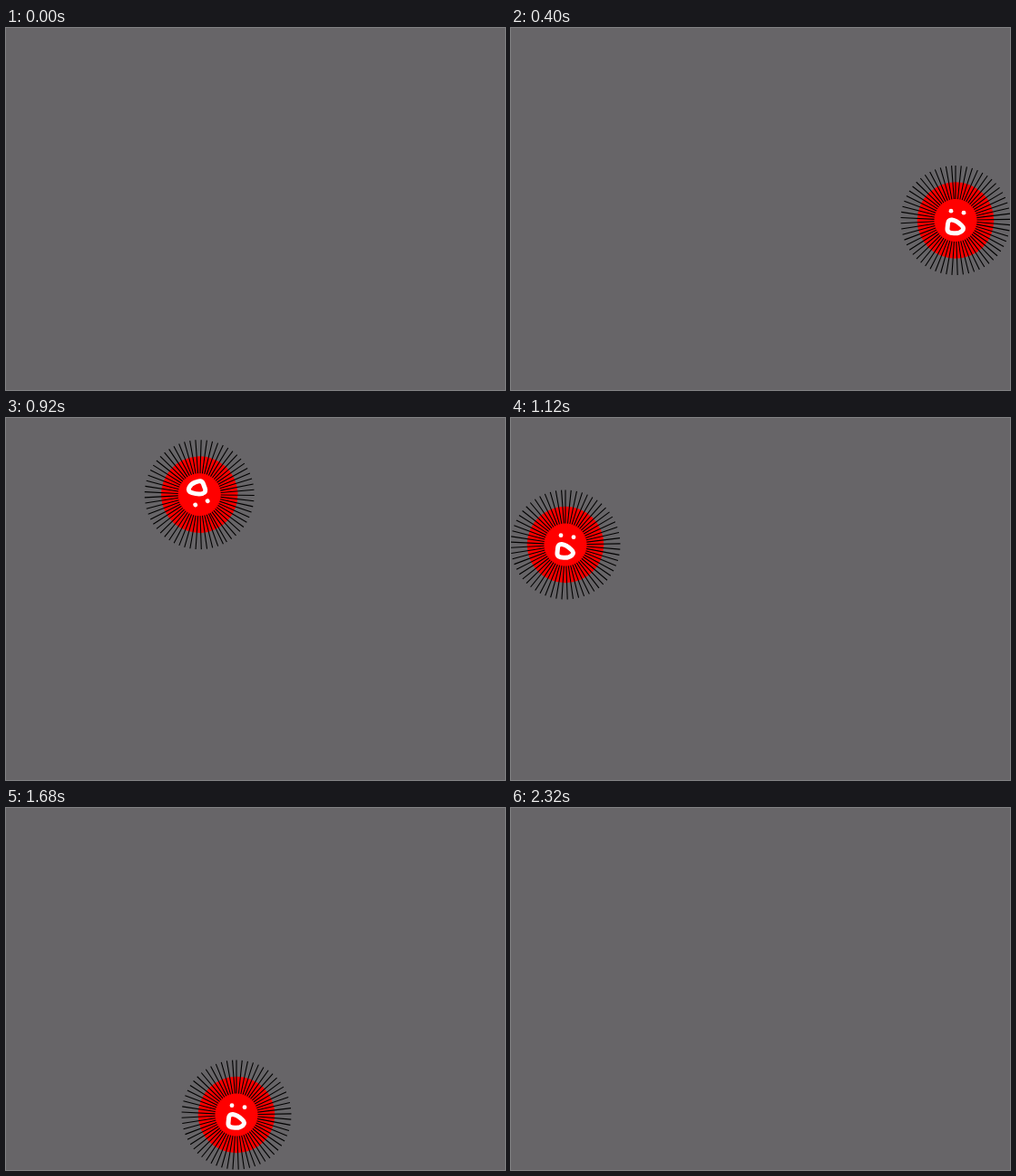
An HTML page with a canvas that plays this animation: 550 by 400 pixels, repeating every 2400 ms.

```html
<!DOCTYPE html>
<html lang="en">
<head>
<meta charset="utf-8">
<title>Bouncing sun</title>
<style>
  html, body { margin: 0; width: 100%; height: 100%; overflow: hidden; background: #676568; }
  canvas { display: block; }
</style>
</head>
<body>
<canvas id="stage" width="550" height="400"></canvas>
<script>
const ctx = document.getElementById('stage').getContext('2d');
const STEP = 40, LOOP = 2400, LAST = 58;
const RAYS = 61, RAY_GAP = 5.93 * Math.PI / 180;

// Bounce points; turns = whole rotations on the way to the next point
const path = [
  { at: 0,  x: -63,   y: 330,   turns: -2 },
  { at: 10, x: 490,   y: 212.5, turns: -4 },
  { at: 21, x: 274.5, y: 62.5,  turns: -2 },
  { at: 28, x: 60,    y: 140,   turns: -4 },
  { at: 42, x: 254,   y: 339,   turns: -2 },
  { at: 52, x: 489,   y: 226.5, turns: -2 },
  { at: 58, x: -63,   y: 330,   turns: 0 }
];

function poseAt(step) {
  let i = 0;
  while (i < path.length - 2 && step >= path[i + 1].at) i++;
  const a = path[i], b = path[i + 1];
  const k = (step - a.at) / (b.at - a.at);
  return {
    x: a.x + (b.x - a.x) * k,
    y: a.y + (b.y - a.y) * k,
    angle: k * a.turns * 2 * Math.PI
  };
}

function disc(x, y, radius, color) {
  ctx.fillStyle = color;
  ctx.beginPath();
  ctx.arc(x, y, radius, 0, 2 * Math.PI);
  ctx.fill();
}

// The ring of rays closes with a slightly narrower gap at the top
function drawRays() {
  ctx.strokeStyle = '#000';
  ctx.lineWidth = 1.1;
  ctx.beginPath();
  for (let i = 0; i < RAYS; i++) {
    const a = i * RAY_GAP - Math.PI / 2;
    const c = Math.cos(a), s = Math.sin(a);
    ctx.moveTo(c * 23.5, s * 23.5);
    ctx.lineTo(c * 60.5, s * 60.5);
  }
  ctx.stroke();
}

function drawFace() {
  disc(-5, -10.3, 2.4, '#fff');
  disc(9, -8.3, 2.4, '#fff');
  ctx.strokeStyle = '#fff';
  ctx.lineWidth = 5;
  ctx.lineJoin = 'round';
  ctx.beginPath();
  ctx.moveTo(-8.5, 4);
  ctx.quadraticCurveTo(-8.3, -0.8, -4, -0.4);
  ctx.quadraticCurveTo(1, 0.3, 6.5, 5.5);
  ctx.quadraticCurveTo(10.3, 9, 7, 11.8);
  ctx.quadraticCurveTo(3.5, 14.8, -2, 14.2);
  ctx.quadraticCurveTo(-9.5, 14.2, -9, 9);
  ctx.closePath();
  ctx.stroke();
}

function draw() {
  const time = performance.now() % LOOP;
  const pose = poseAt(Math.min(LAST, Math.floor(time / STEP)));
  ctx.fillStyle = '#676568';
  ctx.fillRect(0, 0, 550, 400);
  ctx.save();
  ctx.translate(pose.x, pose.y);
  ctx.rotate(pose.angle);
  disc(0, 0, 42.3, '#f00');
  drawRays();
  drawFace();
  ctx.restore();
  requestAnimationFrame(draw);
}
draw();
</script>
</body>
</html>
```
